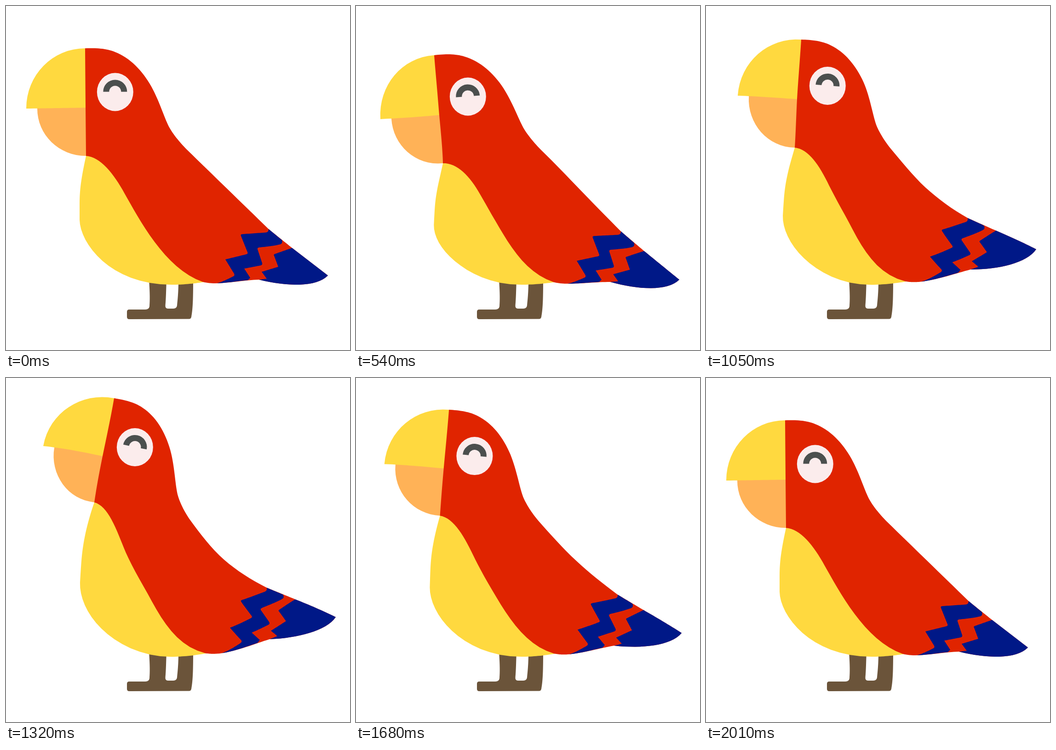
Write an HTML page with a canvas that moves like this. It is 748 by 748 pixels and loops after 2340 ms.

```html
<!DOCTYPE html>
<html lang="en">
<head>
<meta charset="utf-8">
<title>Parrot</title>
<style>
  html, body { margin: 0; width: 100%; height: 100%; overflow: hidden; background: #fff; }
  canvas { display: block; width: 748px; height: 748px; }
</style>
</head>
<body>
<canvas id="stage" width="748" height="748"></canvas>
<script>
const ctx = document.getElementById('stage').getContext('2d');
const LOOP = 2340, STEP = 30;

const RED = '#e02400', YELLOW = '#ffd93f', ORANGE = '#ffb257', BLUE = '#001887';
const BROWN = '#6b543a', EYE = '#fbecec', DARK = '#4b4f4e';

// Pins: beak tip, crown, beak hinge, throat, eye, nape, shoulder, back, chest side,
// chest seam, lower seam, belly; then six pins in the tail.
const TOP = 1, HINGE = 2, EYE_PIN = 4, TAIL = 12;
const rest = [44,223, 172,92, 173,221, 174,326, 237,187, 320,185, 354,262, 470,387, 160,450,
  254,400, 300,480, 215,556, 462,602, 571,485, 511,497, 477,551, 550,595, 700,586];
const sink = [53,246, 170,107, 181,237, 189,342, 243,197, 325,188, 364,265, 478,390, 170,462,
  266,402, 309,478, 220,556, 464,603, 576,490, 515,501, 480,554, 553,600, 703,595];
const low = [55,258, 164,113, 182,241, 195,347, 241.5,199, 326,187, 368,264, 481,389, 176,463,
  271,402, 311,476, 224,554, 465,603, 579,489, 517,500, 482,553, 555,598, 705,592];
const rise = [69,195, 207,73, 198,202.5, 193,308, 264,173.5, 346,177, 370,258, 466,384, 168,440,
  264,382, 308,466, 218,550, 473,598, 569,461, 513,487, 487,545, 575,573, 718,529];
const high = [81,148, 235,44, 210,170, 192,270.5, 280,150.5, 359,168, 373,253, 463,385, 162,427,
  257,370, 305,464, 213,547, 473,597, 567,456, 511,484, 487,543, 573,568, 717,520];
const fixed = [330,604, 380,606];

const mix = (a, b, k) => a.map((v, i) => v + (b[i] - v) * k);
const lowest = mix(rise, low, 10 / 9);
const tailPeak = mix(rest, high, 1.239);

const start = [[0, rest], [210, rest], [540, sink], [750, lowest], [1050, rise]];
const end = [[2010, rest], [LOOP, rest]];
const bodyTrack = [...start, [1320, high], ...end];
const tailTrack = [...start, [1155, tailPeak], ...end];

function poseAt(track, t) {
  const i = track.findIndex(key => key[0] > t);
  const [t0, a] = track[i - 1], [t1, b] = track[i];
  return mix(a, b, (t - t0) / (t1 - t0));
}

function pairs(list) {
  const out = [];
  for (let i = 0; i < list.length; i += 2) out.push([list[i], list[i + 1]]);
  return out;
}

// Thin-plate warp that carries the resting pins to their current places.
const pins = pairs([...rest, ...fixed]);
const N = pins.length;

function basis(x, y) {
  const row = pins.map(([px, py]) => {
    const d = (x - px) ** 2 + (y - py) ** 2;
    return d ? d / 1e4 * Math.log(d / 1e4) : 0;
  });
  return [...row, 1, x / 100, y / 100];
}

function solve(m) {
  const n = m.length;
  for (let c = 0; c < n; c++) {
    let p = c;
    for (let r = c + 1; r < n; r++) if (Math.abs(m[r][c]) > Math.abs(m[p][c])) p = r;
    [m[c], m[p]] = [m[p], m[c]];
    for (let r = 0; r < n; r++) {
      if (r === c) continue;
      const f = m[r][c] / m[c][c];
      if (f) for (let k = c; k < m[r].length; k++) m[r][k] -= f * m[c][k];
    }
  }
  return m.map((row, i) => [row[n] / row[i], row[n + 1] / row[i]]);
}

const pinRows = pins.map(p => basis(...p));

function warpWeights(target) {
  const m = pinRows.map((row, i) => [...row, ...target[i]]);
  for (let k = N; k < N + 3; k++) m.push([...pinRows.map(row => row[k]), 0, 0, 0, 0, 0]);
  return solve(m);
}

// Turns a path of M, L, Q and C commands into points with their warp basis.
function sample(path) {
  const points = [];
  let last;
  for (const part of path.match(/[MLQC][^MLQC]*/g)) {
    const ctrl = pairs(part.slice(1).trim().split(/[\s,]+/).map(Number));
    if (part[0] === 'M') {
      points.push(ctrl[0]);
    } else {
      const n = part[0] === 'Q' ? 4 : 16;
      for (let i = 1; i <= n; i++) {
        let p = [last, ...ctrl];
        while (p.length > 1) p = p.slice(1).map((q, j) => mix(p[j], q, i / n));
        points.push(p[0]);
      }
    }
    last = ctrl[ctrl.length - 1];
  }
  return points.map(p => basis(...p));
}

const legs = new Path2D(`M311 596 C313 625 313 640 312 653 Q311 660 303 660 L268 660
  Q263 660 263 665 L263 676 Q263 681 268 681 L398 680.5 Q402 680.5 403 676
  C406 660 407 640 407 596 L375 596 C375 625 373 640 372 651 Q371 658 364 658
  L352 658 Q346 658 346.5 651 C348 635 348 620 349 596 Z`);

const tailCurve = 'C675 612 610 610 550 595';

const shapes = [
  [YELLOW, `M174 326 C165 368 160 395 160 430 L160 465 C161 515 225 606 360 606
    C385 606 405 604 432 600 L345 500 L270 390 L200 328`],
  [ORANGE, 'M68 220 L68 223 C68 280 115 326 174 326 L180 326 L180 218'],
  [YELLOW, 'M172 92 C101 92 44 150 44 223 L173 221 L182 221 L182 92'],
  [RED, `M172 92 C195 91 218 92 237 100 C270 113 296 140 316 175 C334 208 343 240 354 262
    C362 277 377 296 393 312 L571 485 L622 526 L700 586 ${tailCurve}
    C520 596 490 602 455 603 C445 603 436 602 428 600 C345 572 288 460 258 408
    C234 364 205 328 174 326 L173 221 L172 92`],
  [BLUE, `M571 485 Q571 492 565 492.5 L515 496 Q509 496 511 500 L525 535 Q527 539 522 540
    L477 551 L496 582 Q498 586 494 588 C482 594 470 600 458 603
    C482 602 505 598 526 596 L531 591 L518 571 L554 564 Q558 563 557 559
    L547 529 Q546 526 550 525 C568 523 582 522 597 518 Q602 516 600 509 L571 485`],
  [BLUE, `M622 526 L585 539 Q581 540 583 543 L592 567 L556 578 L567 593 L550 595
    C610 610 675 612 700 586 L622 526`],
].map(([color, path]) => [color, sample(path)]);

function fillWarped(color, points, weights) {
  ctx.beginPath();
  for (const row of points) {
    let x = 0, y = 0;
    row.forEach((v, i) => { x += v * weights[i][0]; y += v * weights[i][1]; });
    ctx.lineTo(x, y);
  }
  ctx.closePath();
  ctx.fillStyle = color;
  ctx.fill();
}

const tilt = p => Math.atan2(p[TOP][0] - p[HINGE][0], p[HINGE][1] - p[TOP][1]);

function drawEye(target) {
  ctx.save();
  ctx.translate(...target[EYE_PIN]);
  ctx.fillStyle = EYE;
  ctx.beginPath();
  ctx.ellipse(0.3, 0, 39.5, 41.5, 0, 0, 2 * Math.PI);
  ctx.fill();
  ctx.rotate(tilt(target) - tilt(pins));
  ctx.strokeStyle = DARK;
  ctx.lineWidth = 13;
  ctx.beginPath();
  ctx.arc(0.3, -0.5, 19.5, Math.PI, 2 * Math.PI);
  ctx.stroke();
  ctx.restore();
}

function draw(t) {
  const body = pairs(poseAt(bodyTrack, t)).slice(0, TAIL);
  const tail = pairs(poseAt(tailTrack, t)).slice(TAIL);
  const target = [...body, ...tail, ...pairs(fixed)];
  const weights = warpWeights(target);
  ctx.fillStyle = '#fff';
  ctx.fillRect(0, 0, 748, 748);
  ctx.fillStyle = BROWN;
  ctx.fill(legs);
  for (const [color, points] of shapes) fillWarped(color, points, weights);
  drawEye(target);
}

const origin = performance.now();
function tick() {
  const t = Math.max(0, performance.now() - origin) % LOOP;
  draw(Math.floor(t / STEP) * STEP);
  requestAnimationFrame(tick);
}
tick();
</script>
</body>
</html>
```
